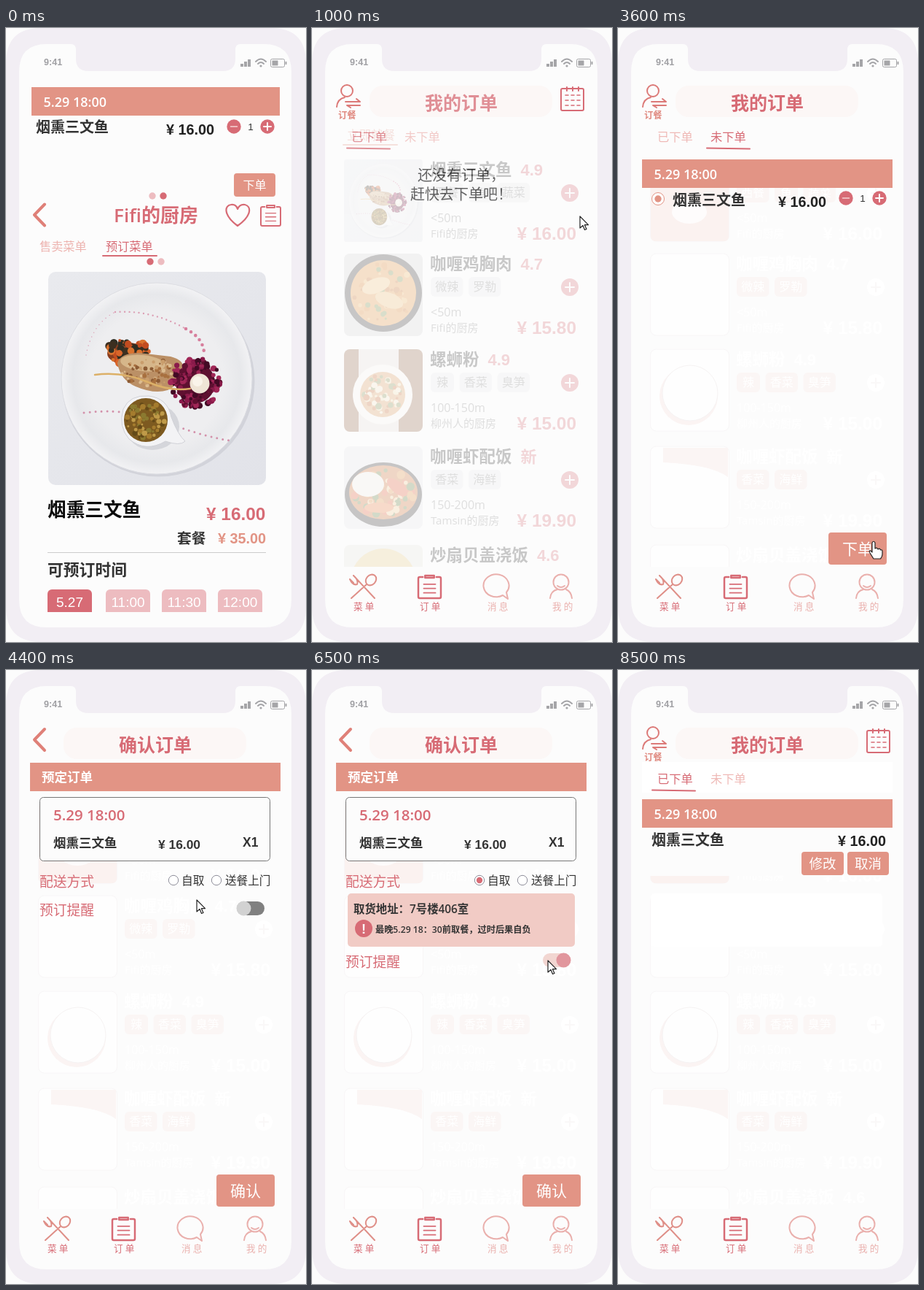
Recreate the animation shown at these times as an HTML page. Size 412x841 px, loop 9100 ms.

```html
<!DOCTYPE html>
<html lang="zh-CN">
<head>
<meta charset="utf-8">
<title>点餐流程</title>
<style>
html, body { margin: 0; width: 100%; height: 100%; overflow: hidden; background: #fcfcfc; }
svg { display: block; width: 100%; height: 100%; }
text { font-family: "Open Sans", "Noto Sans CJK SC", "Noto Sans CJK", sans-serif; white-space: pre; }
.b { font-weight: 700; }
.s { font-weight: 600; }
.num { font-family: "Liberation Sans", sans-serif; font-weight: 700; }
.thin { font-family: "Liberation Sans", sans-serif; }
.line { fill: none; stroke-linecap: round; stroke-linejoin: round; }
</style>
</head>
<body>
<svg id="stage" viewBox="0 0 412 841" preserveAspectRatio="none"></svg>
<script>
const ROSE = '#d76b75', CORAL = '#e29485', PALE = '#edbcc0', INK = '#333', PAGE = '#fcfcfc';
const LOOP = 9100, STEP = 100;

// ---- drawing helpers ----
const text = (x, y, size, str, fill = INK, cls = '', anchor = 'start') =>
  `<text x="${x}" y="${y}" font-size="${size}" fill="${fill}" class="${cls}" text-anchor="${anchor}">${str}</text>`;
const rect = (x, y, w, h, fill, r = 0, more = '') =>
  `<rect x="${x}" y="${y}" width="${w}" height="${h}" rx="${r}" fill="${fill}" ${more}/>`;
const dot = (x, y, r, fill, more = '') => `<circle cx="${x}" cy="${y}" r="${r}" fill="${fill}" ${more}/>`;
const oval = (x, y, rx, ry, fill, turn = 0, more = '') =>
  `<ellipse cx="${x}" cy="${y}" rx="${rx}" ry="${ry}" fill="${fill}" transform="rotate(${turn} ${x} ${y})" ${more}/>`;
const line = (d, color = ROSE, w = 2, more = '') =>
  `<path class="line" d="${d}" stroke="${color}" stroke-width="${w}" ${more}/>`;
const group = (id, body, more = '') => `<g id="${id}" ${more}>${body}</g>`;
const clipped = (id, body) => `<g clip-path="url(#${id})">${body}</g>`;
const button = (x, y, w, h, label, size) => rect(x, y, w, h, CORAL, 4) +
  text(x + w / 2, y + h / 2 + size * .37, size, label, '#fff', '', 'middle');
const bar = (x, y, w) => rect(x, y, w, 39, CORAL) + text(x + 16.5, y + 27, 18, '5.29 18:00', '#fff', 's');
const counter = y => dot(313, y, 9.7, ROSE) + line(`M308.5 ${y}h9`, '#f6d5d5', 1.5) +
  text(336, y + 5, 13.5, '1', INK, 'thin', 'middle') +
  dot(359, y, 9.7, ROSE) + line(`M354 ${y}h10M359 ${y - 5}v10`, '#fff', 2);
const clipboard = (x, y, w, h, sw) =>
  line(`M${x + w * .2} ${y + 3}H${x + 2}q-2 0-2 2V${y + h - 2}q0 2 2 2H${x + w - 2}q2 0 2-2V${y + 5}q0-2-2-2H${x + w * .8}` +
    `M${x + w * .3} ${y + 1}h${w * .4}v3h${-w * .4}z`, ROSE, sw) +
  [.4, .58, .77].map(k => line(`M${x + w * .24} ${y + h * k}h${w * .52}`, ROSE, sw * .7)).join('');
const chevron = (x, y) => line(`M${x + 14} ${y}l-14 14.5 14 14.5`, '#df8078', 4);

function random(seed) {
  return () => (seed = (seed * 16807) % 2147483647) / 2147483647;
}
function specks(n, seed, x, y, rx, ry, colors, size) {
  const rnd = random(seed);
  let out = '';
  for (let i = 0; i < n; i++) {
    const a = rnd() * 6.283, d = Math.sqrt(rnd());
    out += dot((x + rx * d * Math.cos(a)).toFixed(1), (y + ry * d * Math.sin(a)).toFixed(1),
      (size * (.5 + rnd())).toFixed(1), colors[i % colors.length]);
  }
  return out;
}

// ---- dish page ----
const photo = clipped('photo', `${rect(58, 334, 299, 292, 'url(#cloth)')}
  ${oval(209, 484, 132.5, 130.5, '#d2d3da')}${dot(207, 480, 131, 'url(#plate)', 'stroke="#dcdde2"')}
  ${line('M110 448Q118 405 150 389', '#dfa9bc', 1.6, 'stroke-dasharray="0 6.5"')}
  ${line('M150 389Q200 386 245 411', '#dca0b5', 2.4, 'stroke-dasharray="0 6.5"')}
  ${line('M247 412Q270 424 272 444', '#d77f9d', 4.6, 'stroke-dasharray="0 8"')}
  ${line('M107 527Q150 522 180 530M236 546Q275 560 307 565', '#d391aa', 3, 'stroke-dasharray="0 8"')}
  ${oval(167, 446, 28, 15, '#8a3f20')}
  ${specks(70, 7, 167, 443, 30, 17, ['#d9652a', '#2f2d22', '#c24c20', '#d9732f', '#3c2f20'], 3.8)}
  <path d="M153 459Q157 445 183 445L226 450Q246 455 243 468Q240 488 222 496Q204 502 178 491Q157 482 153 459Z" fill="#bb9066"/>
  ${oval(188, 459, 31, 11, '#d6b68a', 6)}
  ${specks(80, 31, 199, 472, 40, 19, ['#8d5c35', '#dcbc90', '#a8703f', '#c99d6c'], 2)}
  ${oval(260, 486, 27, 28, '#5d1030')}
  ${specks(170, 91, 260, 485, 34, 35, ['#5f1030', '#8a1a4a', '#430a25', '#a02656'], 3)}
  ${line('M122 475Q160 470 195 485Q225 498 253 494', '#dcb068', 2.5)}
  ${dot(266, 487, 13.5, '#efe5d6')}${dot(263, 484, 7, '#faf4ea')}
  ${oval(201, 546, 37, 32, '#d5d6db')}
  <path d="M161 522Q170 502 196 504Q222 507 227 533Q236 557 246 566Q239 573 219 566Q192 582 169 563Q154 546 161 522Z" fill="#f3f3f5" stroke="#cfd0d6"/>
  ${dot(192, 537, 30, '#7d5a20')}
  ${specks(80, 53, 192, 537, 26, 26, ['#a57c2e', '#bf9a48', '#644a18', '#8b7a30'], 2.6)}`);

const slots = ['5.27', '11:00', '11:30', '12:00'].map((s, i) => {
  const x = [57, 137, 214, 291][i];
  return rect(x, 769, 61, 40, i ? PALE : ROSE, 6) + text(x + 30.5, 793, 19, s, '#fff', 'thin', 'middle');
}).join('');

const detail = bar(35, 81, 341) + text(41, 143, 20, '烟熏三文鱼', INK, 'b') +
  text(220, 146, 19.8, '¥ 16.00', '#222', 'num') + counter(135) + button(313, 199, 57, 32, '下单', 16) +
  dot(201, 230, 4.7, PALE) + dot(216, 230, 4.7, ROSE) + dot(198, 320, 4.7, ROSE) + dot(213, 320, 4.7, PALE) +
  chevron(39, 241.5) + text(206, 266, 26, 'Fifi的厨房', ROSE, 's', 'middle') +
  line('M318 271C298 256 300 243 309 242Q316 241 318 248Q321 241 328 242C337 244 338 257 318 271Z', ROSE, 2.2) +
  clipboard(350, 242, 27, 29, 2) +
  text(46, 305, 16.2, '售卖菜单', '#edb4b0') + text(137, 305, 16.2, '预订菜单', ROSE) +
  line('M133 312H207', ROSE, 2) + group('dish', photo) +
  text(57, 669, 25.7, '烟熏三文鱼', '#0a0a0a', 'b') + text(275, 674, 24.4, '¥ 16.00', ROSE, 'num') +
  text(235, 706, 19.7, '套餐', INK, 'b') + text(291, 706, 19.8, '¥ 35.00', CORAL, 'num') +
  rect(57, 718, 300, 1, '#ccc') + text(57, 750, 21.8, '可预订时间', INK, 'b') + clipped('slots', slots);

// ---- dish list ----
const rows = [
  [180, '烟熏三文鱼', '4.9', ['西餐', '鱼', '蔬菜'], '&lt;50m', 'Fifi的厨房', '16.00'],
  [309, '咖喱鸡胸肉', '4.7', ['微辣', '罗勒'], '&lt;50m', 'Fifi的厨房', '15.80'],
  [440, '螺蛳粉', '4.9', ['辣', '香菜', '臭笋'], '100-150m', '柳州人的厨房', '15.00'],
  [573, '咖喱虾配饭', '新', ['香菜', '海鲜'], '150-200m', 'Tamsin的厨房', '19.90'],
  [708, '炒扇贝盖浇饭', '4.6', [], '', '', '']
];
const meals = [
  y => `<g transform="translate(44 ${y}) scale(.361 .387) translate(-58 -334)">${photo}</g>`,
  y => rect(44, y, 108, 113, '#d5d5d7', 8) + dot(98, y + 54, 53, '#2f2b2a') + dot(98, y + 54, 45, '#e2913a') +
    specks(60, 17, 98, y + 54, 41, 41, ['#d97c22', '#eeb25e', '#c66a1e', '#76883e'], 3) +
    oval(88, y + 44, 20, 10, '#f0c27c', -20) + oval(106, y + 64, 20, 10, '#eebb70', 20),
  y => rect(44, y, 108, 113, '#8f6142', 8) + rect(64, y, 55, 113, '#e6dfd8') + dot(97, y + 62, 41, '#f7f4ef') +
    dot(97, y + 62, 31, '#d9985a') + specks(60, 23, 97, y + 62, 27, 27, ['#f0dcae', '#c4652a', '#f4e6c4', '#7f8a4a'], 3),
  y => rect(44, y, 108, 113, '#e4e5e8', 8) + oval(98, y + 66, 53, 44, '#2b2828') + oval(98, y + 63, 47, 37, '#c96a2c') +
    specks(60, 29, 98, y + 63, 42, 32, ['#e2562f', '#df8a3c', '#5f7a35', '#f0c890'], 4) +
    oval(77, y + 52, 22, 17, '#f2eee4') + oval(117, y + 56, 17, 8, '#e2562f', 40) + oval(92, y + 84, 20, 7, '#e87a3c'),
  y => rect(44, y, 108, 113, '#e6e4df', 8) + dot(98, y + 50, 45, '#e3c985')
];
const marks = [
  y => rect(45, y + 2, 107, 110, '#fbf2f0', 6) + oval(98, y + 72, 24, 16, '#fefcfc'),
  () => '',
  y => dot(97, y + 64, 40, '#fbf4f3') + dot(99, y + 60, 38, '#fefefe', 'stroke="#f6f3f3"'),
  y => `<path d="M62 ${y + 2}H151V${y + 42}Q128 ${y + 25} 62 ${y + 22}Z" fill="#fbf5f4"/>`,
  () => ''
];
// The faded form is the pale imprint left behind the order pages.
function menu(faded) {
  const c = (full, pale = '#fff') => faded ? pale : full;
  return rows.map(([y, name, score, tags, far, shop, price], i) => {
    let x = 163, out = faded
      ? rect(44.5, y, 108, 112, '#fefefe', 8, 'stroke="#f8f6f7"') + marks[i](y) : meals[i](y);
    out += text(162, y + 22, 22.5, name, c(INK), 's') +
      text(174 + 22.5 * name.length, y + 22, 22, score, c(ROSE), score === '新' ? 'b' : 'num');
    for (const tag of tags) {
      const w = tag.length > 1 ? 44.5 : 32;
      out += rect(x, y + 32, w, 27, c('#e9e9eb', '#fbf6f5'), 6) + text(x + w / 2, y + 51, 16, tag, c('#8a8a8a'), '', 'middle');
      x += w + 7.5;
    }
    if (!price) return out;
    return out + dot(354, y + 46, 12, c(ROSE)) + line(`M348 ${y + 46}h12M354 ${y + 40}v12`, c('#fff', '#faf8f8'), 2) +
      text(163, y + 86, 16, far, c('#8a8a8a')) + text(163, y + 107, 15, shop, c('#8a8a8a')) +
      text(363, y + 110, 24.4, '¥ ' + price, c(ROSE), 'num', 'end');
  }).join('');
}
const header = rect(79, 79, 251, 43, '#fcf7f6', 18);
const account = dot(48, 86, 8, 'none', 'stroke="#dc7a78" stroke-width="2"') +
  line('M34 108Q35 97 45 95M46 101H66L61 97M66 106H48L53 109', '#dc7a78', 2) +
  text(36, 124, 12.3, '订餐', '#e08a80', 'b');
const calendar = rect(342, 83, 31, 30, 'none', 2, `stroke="${ROSE}" stroke-width="2"`) +
  line('M350 81v5M358 81v5M366 81v5', ROSE, 2) +
  [92, 99, 106].map(y => line(`M348 ${y}h4M356 ${y}h4M364 ${y}h4`, ROSE, 1.6)).join('');
const list = rect(33, 70, 347, 670, PAGE) + header + account + calendar +
  text(48, 153, 16.5, '立即就餐', CORAL) + line('M43 160H117', CORAL, 2) + clipped('body', menu(false));

// ---- order pages ----
const base = (title, id) => rect(33, 70, 347, 670, PAGE) + group(id, clipped('body', menu(true))) + header +
  text(205, 111.5, 25, title, ROSE, 'b', 'middle');
const tabs = text(54, 155, 16.3, '已下单', ROSE, 'tabA') + text(127, 155, 16.3, '未下单', '#efb9b6', 'tabB');

const orders = base('我的订单', 'imprint') + account + clipped('cal', group('month', calendar)) + tabs +
  group('under', line('M48 164.5L107 165.5', ROSE, 2)) +
  clipped('body',
    group('empty', text(145, 209, 20, '还没有订单，') + text(135, 235, 20, '赶快去下单吧！')) +
    group('pending', bar(33, 180, 344) +
      dot(55, 234, 8.5, '#fff', `stroke="${CORAL}"`) + group('pick', dot(55, 234, 4.7, CORAL)) +
      text(75, 242.5, 20, '烟熏三文鱼', INK, 'b') + text(220, 245, 19.8, '¥ 16.00', '#222', 'num') +
      counter(233) + button(289, 691, 80, 44, '下单', 21)));

const radio = x => dot(x, 288, 6.7, '#fff', 'stroke="#8d8d99"');
const confirm = base('确认订单', 'imprint2') + chevron(39, 81) +
  rect(33, 127, 344, 39, CORAL) + text(49, 153, 17.5, '预定订单', '#fff', 'b') +
  rect(46.5, 174.5, 316, 87, PAGE, 5, 'stroke="#777"') + text(65, 206, 20.5, '5.29 18:00', ROSE, 's') +
  text(65, 243, 17.5, '烟熏三文鱼', INK, 'b') + text(209, 245, 17.4, '¥ 16.00', INK, 'num') +
  text(325, 242, 17.5, 'X1', INK, 'num') + text(46, 297, 18.8, '配送方式', ROSE) +
  radio(230) + radio(289) + group('pickup', dot(230, 288, 4.2, ROSE)) +
  text(241, 294, 15.7, '自取') + text(301, 294, 15.6, '送餐上门') +
  group('address', rect(49, 306, 312, 73, '#f1cbc5', 5) + text(57, 333, 15.4, '取货地址：7号楼406室', INK, 's') +
    dot(71, 354, 12, ROSE) + text(71, 361, 18, '!', '#fff', 'num', 'middle') +
    text(87, 360, 12.2, '最晚5.29 18：30前取餐，过时后果自负', INK, 's')) +
  group('remind', text(46, 336, 18.8, '预订提醒', ROSE) +
    group('off', rect(317, 317, 38, 19, '#808080', 9.5) + dot(326.5, 326.5, 10, '#d2d2d2')) +
    group('on', rect(317, 317, 38, 19, '#eec6c0', 9.5) + dot(345.5, 326.5, 10, ROSE))) +
  button(289, 691, 80, 44, '确认', 21);

const done = base('我的订单', 'imprint3') + rect(33, 126, 344, 42, '#fff') + account + calendar +
  text(54, 155, 16.3, '已下单', ROSE) + text(127, 155, 16.3, '未下单', '#efb9b6') +
  line('M47 164.5L106 165.5', ROSE, 2) + rect(33, 216, 344, 66, PAGE) + rect(45, 306, 318, 73, '#fff', 5) +
  bar(33, 177, 344) + text(46, 239.5, 20, '烟熏三文鱼', INK, 'b') + text(302, 241, 19.8, '¥ 16.00', '#222', 'num') +
  button(252, 249, 58, 32, '修改', 18.5) + button(315, 249, 57, 32, '取消', 18.5);

const SOFT = '#eab0ad', TOOL = '#df8f88';
const nav = line('M57 750L86 781M52 755Q56 764 62 762M52 755L57 760M62 762Q64 756 57 750M54 781L75 762', TOOL, 2) +
  oval(81, 756, 6.5, 8, 'none', 42, `stroke="${TOOL}" stroke-width="2"`) +
  clipboard(146, 749, 31, 32, 2.5) +
  line('M262 777A17.5 15.5 0 1 1 267 773L269 782Z', SOFT, 2) +
  dot(342, 759, 10.5, 'none', `stroke="${SOFT}" stroke-width="2"`) +
  line('M327 781Q328 771 337 769M357 781Q356 772 349 769M337 764Q342 768 347 764', SOFT, 2) +
  [[57, '菜 单', ROSE], [148, '订 单', ROSE], [241, '消 息', SOFT], [330, '我 的', SOFT]]
    .map(([x, s, c]) => text(x, 797, 12.6, s, c)).join('');

// ---- phone shell and pointer ----
const GREY = '#a5a5a8';
const shell = `<path fill="#f2eef4" fill-rule="evenodd" d="M48 0H364Q412 0 412 48V793Q412 841 364 841H48Q0 841 0 793V48Q0 0 48 0Z
  M56 22Q18 22 18 60V783Q18 821 56 821H354Q392 821 392 783V60Q392 22 354 22H322Q315 22 315 30V42Q315 59 298 59H113Q96 59 96 42V30Q96 22 89 22Z"/>` +
  text(52, 51, 12.6, '9:41', '#a0a0a4', 'num') +
  [0, 1, 2].map(i => rect(322 + 5 * i, 49 - 3 * i, 4, 4 + 3 * i, GREY)).join('') +
  line('M343 46Q350 39 357 46M346 49Q350 45 354 49', GREY, 2) + dot(350, 52, 1.6, GREY) +
  rect(363.5, 42.5, 19, 11, 'none', 2, `stroke="${GREY}"`) + rect(365.5, 44.5, 8, 7, GREY) + rect(383.5, 46, 2, 4, GREY);
const pointer = group('arrow', '<path d="M0 0V16L4 12.5 6.5 18.5 9 17.5 6.4 11.7H11.5Z"/>') +
  group('hand', '<path d="M-2 2Q0-1.5 2 2V10Q5 8 6 11Q9 9 9.5 12Q12 11 12 14V18Q12 21 9.5 24H0L-5 16Q-7 12-4 13L-2 15Z"/>');

const clip = (id, x, y, w, h, r = 0) => `<clipPath id="${id}">${rect(x, y, w, h, '#000', r)}</clipPath>`;
document.getElementById('stage').innerHTML = `<defs>
  <linearGradient id="cloth" x2="1" y2="1"><stop stop-color="#e9eaee"/><stop offset="1" stop-color="#e2e3e9"/></linearGradient>
  <radialGradient id="plate"><stop offset=".7" stop-color="#eeeef0"/><stop offset=".88" stop-color="#e7e8eb"/><stop offset="1" stop-color="#f2f2f4"/></radialGradient>
  ${clip('photo', 58, 334, 299, 292, 10)}${clip('slots', 50, 760, 310, 40)}
  ${clip('body', 33, 170, 344, 568)}${clip('cal', 340.5, 78, 36, 40)}</defs>` +
  rect(0, 0, 412, 841, PAGE) +
  group('detail', detail) + group('list', list) + group('orders', orders) +
  group('confirm', confirm) + group('done', done) + group('nav', nav) + shell +
  group('cursor', pointer, 'fill="#fff" stroke="#222" stroke-width="1.2" stroke-linejoin="round"');

// ---- timeline ----
const el = {};
document.querySelectorAll('g[id]').forEach(g => el[g.id] = g);
const [tabA] = document.getElementsByClassName('tabA'), [tabB] = document.getElementsByClassName('tabB');

// keys: [ms, value, value...], linear between them
function track(t, keys) {
  const i = keys.findIndex(k => k[0] > t);
  if (i < 0) return keys[keys.length - 1].slice(1);
  if (!i) return keys[0].slice(1);
  const a = keys[i - 1], b = keys[i], p = (t - a[0]) / (b[0] - a[0]);
  return a.slice(1).map((v, n) => v + (b[n + 1] - v) * p);
}
const within = (t, a, b) => t >= a && t < b;
const swing = p => .5 - Math.cos(Math.PI * Math.min(1, Math.max(0, p))) / 2;
const path = [
  [100, 430, 204], [200, 402, 204], [300, 386, 222], [400, 373, 247], [500, 368, 258], [1400, 368, 258],
  [1500, 340, 245], [1700, 190, 175], [1800, 147, 153], [2400, 147, 153], [2600, 90, 200], [2800, 56, 233],
  [3000, 56, 233], [3100, 110, 300], [3200, 230, 520], [3300, 320, 720], [3400, 350, 780], [3500, 352, 735], [3600, 351, 703],
  [4100, 351, 703], [4200, 324, 605], [4300, 295, 400], [4400, 262, 315], [4600, 243, 270], [4800, 236, 266], [5100, 235, 291],
  [5600, 235, 291], [5800, 262, 325], [6000, 312, 385], [6100, 324, 398],
  [6900, 324, 398], [7000, 328, 480], [7100, 345, 640], [7200, 352, 750], [7300, 350, 704],
  [8000, 350, 704], [8200, 372, 530], [8300, 385, 410], [8400, 402, 300], [8500, 430, 240]
];

const show = (name, v) => {
  el[name].setAttribute('opacity', +v);
  el[name].style.display = v > 0 ? '' : 'none';
};
const move = (name, x, y) => el[name].setAttribute('transform', `translate(${x} ${y})`);

function render(t) {
  show('detail', t < 800);
  show('list', within(t, 800, 1200));
  show('imprint', t >= 1200);
  show('nav', t >= 800);
  show('orders', track(t, [[700, 0], [800, .2], [900, .5], [1000, .74], [1100, .92], [1200, 1]])[0]);
  show('confirm', track(t, [[3700, 0], [3800, .35], [3900, .75], [4000, 1]])[0]);
  show('done', track(t, [[7600, 0], [7700, .3], [7800, .65], [7900, .9], [8000, 1]])[0]);

  const slide = swing((t - 1846) / 500), second = t >= 2000;
  move('empty', -355 * slide, 0);
  move('pending', 355 * (1 - slide), 0);
  move('month', -36 * slide, 0);
  move('under', t >= 2100 ? 74 : 0, 0);
  tabA.setAttribute('fill', second ? '#efb9b6' : ROSE);
  tabB.setAttribute('fill', second ? ROSE : '#efb9b6');
  show('pick', t >= 3000);

  const [open] = track(t, [[5200, 0], [5300, .35], [5400, .75], [5500, 1]]);
  show('pickup', t >= 5300);
  show('address', open);
  move('remind', 0, 71 * open);
  show('off', t < 6500);
  show('on', t < 6500 ? 0 : t < 6600 ? .7 : 1);

  const hand = within(t, 500, 1000) || within(t, 1800, 2500) || within(t, 2800, 3100) ||
    within(t, 3500, 4200) || within(t, 5000, 5400) || within(t, 7200, 7800);
  show('hand', hand);
  show('arrow', !hand);
  move('cursor', ...track(t, path));
}

const start = performance.now();
function frame() {
  const t = (performance.now() - start) % LOOP;
  render(Math.floor(t / STEP) * STEP);
  requestAnimationFrame(frame);
}
frame();
</script>
</body>
</html>
```
